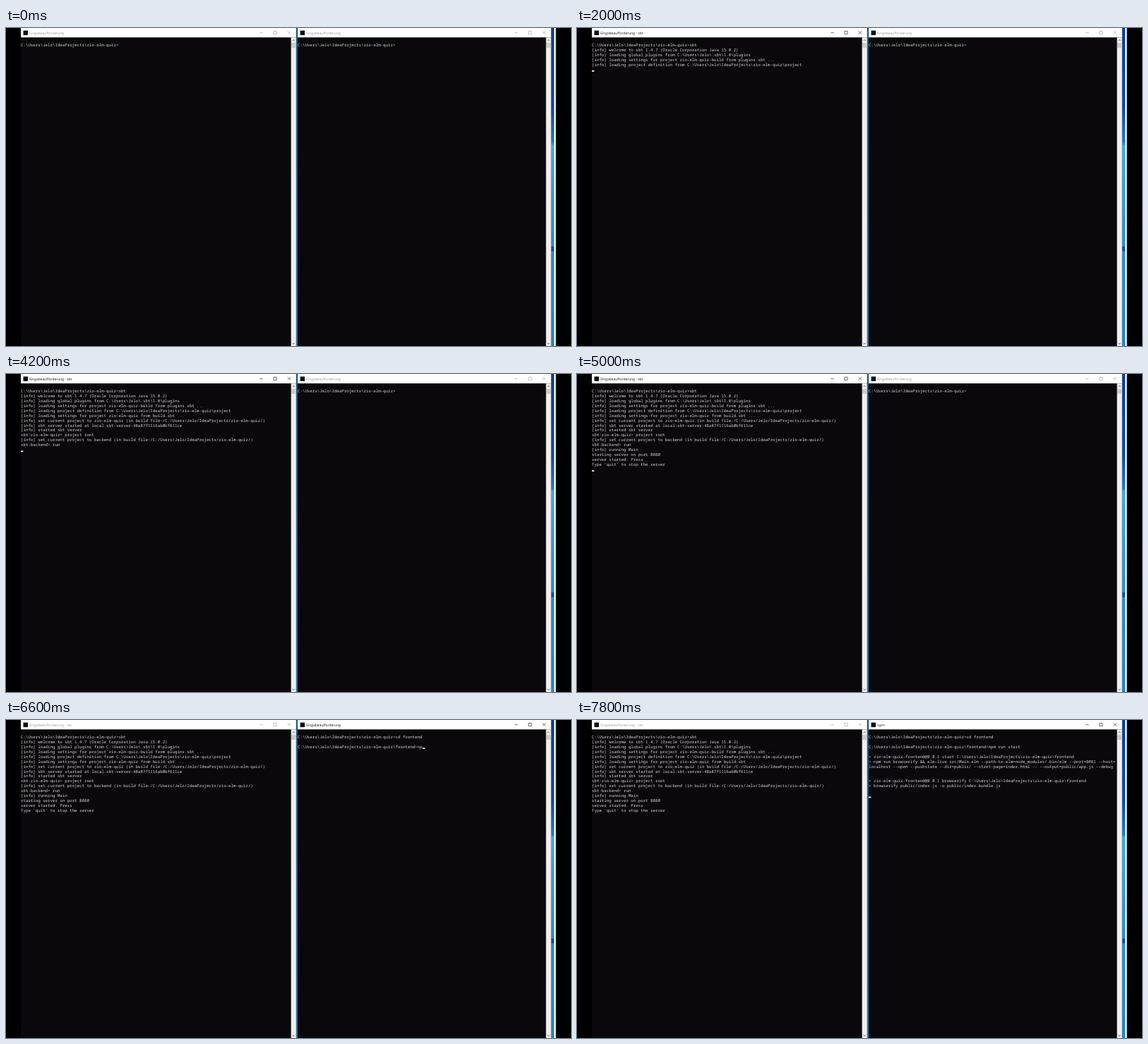
These frames come from a looping animation (800x450 px, 8 s). An HTML page:

```html
<!DOCTYPE html>
<html lang="de">
<head>
<meta charset="utf-8">
<title>Two terminals</title>
<style>
  html, body { margin: 0; width: 100%; height: 100%; overflow: hidden; background: #000; }
  svg { display: block; width: 100%; height: 100%; }
  text { white-space: pre; text-rendering: geometricPrecision; }
  .console { font: 5.775px "Noto Sans Mono", "DejaVu Sans Mono", monospace; fill: #d6d6d6; font-variant-ligatures: none; }
  .title { font: 4.95px "Open Sans", sans-serif; }
</style>
</head>
<body>
<svg id="stage" viewBox="0 0 800 450">
  <defs>
    <linearGradient id="desktop" x2="0" y2="1">
      <stop offset="0" stop-color="#0a3fa0"/>
      <stop offset=".25" stop-color="#0b48ae"/>
      <stop offset=".36" stop-color="#1c7cc8"/>
      <stop offset=".37" stop-color="#35b0e0"/>
      <stop offset=".65" stop-color="#2391d3"/>
      <stop offset="1" stop-color="#1f86c8"/>
    </linearGradient>
    <linearGradient id="gap" x2="0" y2="1">
      <stop offset="0" stop-color="#0d5a94"/>
      <stop offset="1" stop-color="#1673ad"/>
    </linearGradient>
  </defs>
  <rect width="800" height="450"/>
  <rect x="410.5" width="3" height="450" fill="url(#gap)"/>
  <rect x="771" width="5" height="450" fill="url(#desktop)"/>
  <rect x="772" y="309" width="4" height="7" fill="#1450a8"/>
  <rect x="776" width="2.6" height="450" fill="#f4f6f8"/>
</svg>
<script>
const LOOP = 8000, TICK = 200, CHAR = 3.465, LINE = 6.93, BASELINE = 26;
const HOME = String.raw`C:\Users\Jelo`;
const PROJECT = HOME + String.raw`\IdeaProjects\zio-elm-quiz`;
const BUILD = "(in build file:/C:/Users/Jelo/IdeaProjects/zio-elm-quiz/)";
const stage = document.getElementById("stage");

function add(parent, tag, attributes) {
  const node = document.createElementNS("http://www.w3.org/2000/svg", tag);
  for (const name in attributes) node.setAttribute(name, attributes[name]);
  return parent.appendChild(node);
}

const print = (at, ...lines) => lines.map(text => ({ at, text }));
// rate: characters per tick
const input = (at, prompt, typed, start, rate, enter) => ({ at, text: prompt, typed, start, rate, enter });

const leftLines = [
  input(0, PROJECT + ">", "sbt", 400, 1, 1200),
  ...print(1600, "[info] welcome to sbt 1.4.7 (Oracle Corporation Java 15.0.2)"),
  ...print(1800, `[info] loading global plugins from ${HOME}\\.sbt\\1.0\\plugins`),
  ...print(2000,
    "[info] loading settings for project zio-elm-quiz-build from plugins.sbt ...",
    `[info] loading project definition from ${PROJECT}\\project`),
  ...print(2400, "[info] loading settings for project zio-elm-quiz from build.sbt ..."),
  ...print(2600,
    `[info] set current project to zio-elm-quiz ${BUILD}`,
    "[info] sbt server started at local:sbt-server-48a87f1116ab0bf611ce",
    "[info] started sbt server"),
  input(2600, "sbt:zio-elm-quiz> ", "project root", 2600, 4, 3400),
  ...print(3600, `[info] set current project to backend ${BUILD}`),
  input(3600, "sbt:backend> ", "run", 3600, 2, 4200),
  ...print(4400, "[info] running Main"),
  ...print(4600, "starting server on port 8080"),
  ...print(4800, "server started. Press", "Type 'quit' to stop the server")
];

const rightLines = [
  input(0, PROJECT + ">", "cd frontend", 5200, 3, 6200),
  ...print(6200, ""),
  input(6200, PROJECT + "\\frontend>", "npm run start", 6480, 4, 7400),
  ...print(7400, ""),
  ...print(7600,
    `> zio-elm-quiz-frontend@0.0.1 start ${PROJECT}\\frontend`,
    "> npm run browserify && elm-live src/Main.elm --path-to-elm=node_modules/.bin/elm --port=8081 --host=",
    "localhost --open --pushstate --dir=public/ --start-page=index.html -- --output=public/app.js --debug"),
  ...print(7800, "", "",
    `> zio-elm-quiz-frontend@0.0.1 browserify ${PROJECT}\\frontend`,
    "> browserify public/index.js -o public/index.bundle.js", "")
];

function createWindow({ x, right, buttons, lines, titleAt, focus }) {
  const group = add(stage, "g", {});
  const rect = (left, top, width, height, fill) => add(group, "rect", { x: left, y: top, width, height, fill });
  const bar = right - 7.2, middle = right - 3.6;

  rect(x, 0, right - x, 450, "#0a080a");
  rect(x, 0, right - x, 13.3, "#fff");
  rect(x + 3.5, 3.6, 6.5, 6.5, "#111");
  rect(bar, 13.3, 7.2, 436.7, "#f0f0f0");
  rect(bar + .4, 21, 6.4, 7, "#cdcdcd");
  add(group, "path", {
    d: `M${middle - 1.7} 18.2l1.7 -1.7 1.7 1.7M${middle - 1.7} 445.6l1.7 1.7 1.7 -1.7`,
    fill: "none", stroke: "#555", "stroke-width": .9
  });

  const [minimize, maximize, close] = buttons;
  const icons = add(group, "path", {
    d: `M${minimize - 2.2} 6.7h4.4M${maximize - 2.1} 4.5h4.2v4.2h-4.2zM${close - 2.2} 4.3l4.4 4.4m0 -4.4l-4.4 4.4`,
    fill: "none", "stroke-width": .6
  });
  const title = add(group, "text", { class: "title", x: x + 12.2, y: 8.5 });
  const rows = lines.map((_, i) => add(group, "text", { class: "console", x, y: BASELINE + i * LINE }));
  const cursor = add(group, "rect", { width: 3.4, height: 1.8, fill: "#eee" });

  return time => {
    const active = time >= focus[0] && time < focus[1];
    title.textContent = titleAt(time);
    title.setAttribute("fill", active ? "#111" : "#999");
    icons.setAttribute("stroke", active ? "#111" : "#999");

    let row = 0, column = 0;
    lines.forEach((line, i) => {
      let text = "";
      if (time >= line.at) {
        text = line.text;
        if (line.typed) {
          const count = Math.floor((time - line.start) / TICK * line.rate);
          text += line.typed.slice(0, Math.max(0, count));
        }
        const editing = line.typed && time < line.enter;
        row = editing ? i : i + 1;
        column = editing ? text.length : 0;
      }
      rows[i].textContent = text;
    });

    const blink = time % 1200;
    cursor.setAttribute("x", x + column * CHAR);
    cursor.setAttribute("y", BASELINE + row * LINE - .7);
    cursor.setAttribute("visibility", active && blink >= 200 && blink < 1000 ? "visible" : "hidden");
  };
}

const windows = [
  createWindow({
    x: 21, right: 410.8, buttons: [361.5, 381, 401], lines: leftLines, focus: [200, 5200],
    titleAt: time => "Eingabeaufforderung" + (time >= 1200 ? " - sbt" : "")
  }),
  createWindow({
    x: 413, right: 771.8, buttons: [722.5, 742, 761.8], lines: rightLines, focus: [5200, LOOP],
    titleAt: time => time >= 7400 ? "npm" : "Eingabeaufforderung"
  })
];

function frame() {
  const time = Math.floor(performance.now() % LOOP / TICK) * TICK;
  windows.forEach(draw => draw(time));
  requestAnimationFrame(frame);
}
frame();
</script>
</body>
</html>
```
